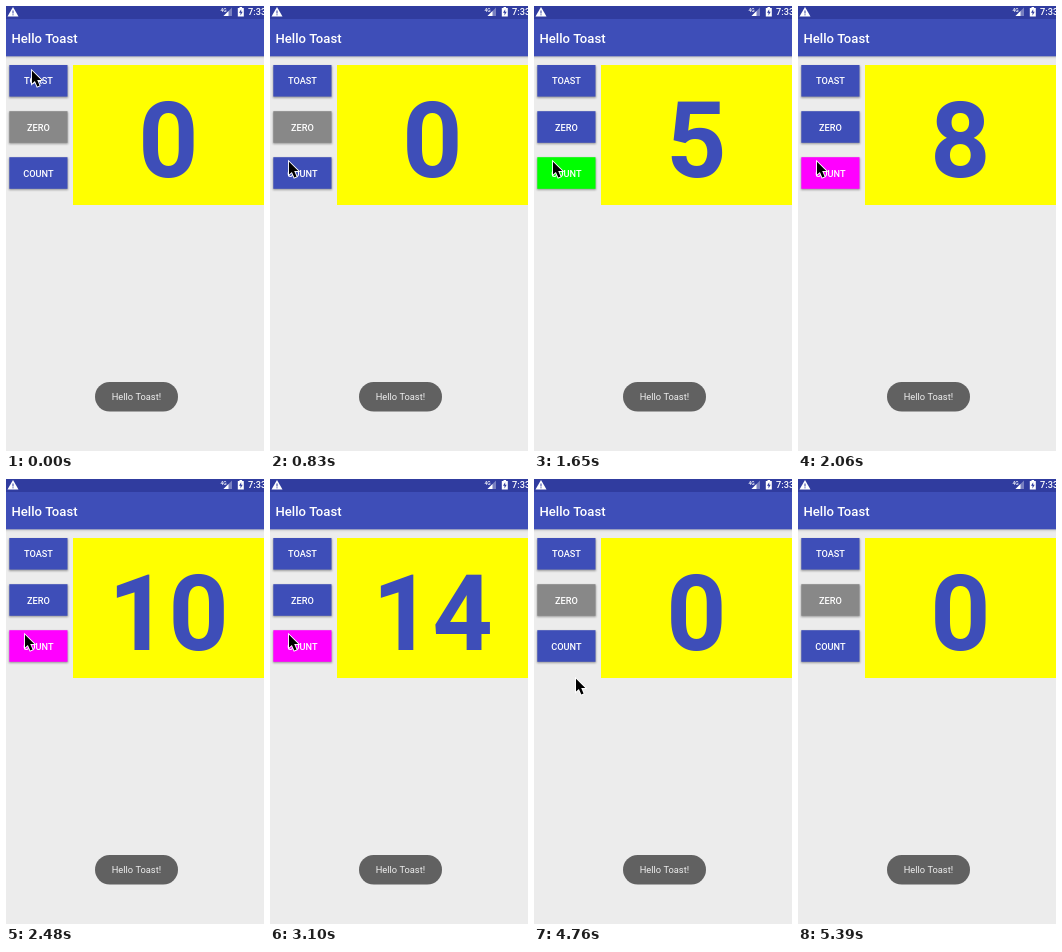
Recreate the animation shown at these times as an HTML page with a canvas. Size 258 px wide and 445 px high, loop 5.97 s.

```html
<!DOCTYPE html>
<html lang="en">
<head>
<meta charset="utf-8">
<title>Hello Toast</title>
<style>
html, body { margin: 0; width: 258px; height: 445px; overflow: hidden; background: #ececec; }
canvas { display: block; width: 258px; height: 445px; }
</style>
</head>
<body>
<canvas id="stage"></canvas>
<script>
const W = 258, H = 445, LOOP = 5970;
const BLUE = '#3e4eb8', GRAY = '#888', PINK = '#ff00ff', GREEN = '#00ff00';
const canvas = document.getElementById('stage');
const ratio = window.devicePixelRatio || 1;
canvas.width = W * ratio;
canvas.height = H * ratio;
const ctx = canvas.getContext('2d');
ctx.scale(ratio, ratio);

// Pointer samples: time, x, y
const pointer = [
  [0, 25, 63], [210, 14, 120], [410, 14, 124], [620, 16, 148],
  [830, 18, 154], [3310, 19, 106], [3520, 20, 103], [3720, 21, 115],
  [4760, 41, 198], [4970, 125, 401], [5180, 196, 435], [5390, -50, -50]
];
// Counter samples: time, value
const counter = [
  [0, 0], [1030, 1], [1240, 2], [1450, 3], [1650, 5], [1860, 6], [2060, 8],
  [2270, 9], [2480, 10], [2690, 11], [2890, 13], [3100, 14], [3930, 0]
];

const at = (steps, t) => steps.filter(s => s[0] <= t).pop();

function rect(x, y, w, h, color) {
  ctx.fillStyle = color;
  ctx.fillRect(x, y, w, h);
}

function shape(points, color) {
  ctx.beginPath();
  points.forEach(([x, y]) => ctx.lineTo(x, y));
  ctx.closePath();
  ctx.fillStyle = color;
  ctx.fill();
}

function text(str, x, y, size, weight, color = '#fff', align = 'center') {
  ctx.font = `${weight} ${size}px Roboto, sans-serif`;
  ctx.textAlign = align;
  ctx.fillStyle = color;
  ctx.fillText(str, x, y);
}

function raised(blur, draw) {
  ctx.save();
  ctx.shadowColor = 'rgba(0,0,0,.35)';
  ctx.shadowBlur = blur * ratio;
  ctx.shadowOffsetY = ratio;
  draw();
  ctx.restore();
}

function button(label, y, color) {
  raised(2, () => rect(3.3, y, 58.2, 31.6, color));
  text(label, 32.4, y + 19.3, 9.2, 500);
}

function statusBar() {
  rect(0, 0, W, 13, '#303c9f');
  shape([[7, 1], [12.5, 10.5], [1.5, 10.5]], '#fff');
  rect(6.5, 4.5, 1, 3, '#303c9f');
  rect(6.5, 8.3, 1, 1, '#303c9f');
  text('4G', 214.5, 5.5, 5, 500, '#fff', 'left');
  shape([[226, 1.5], [226, 10], [217.5, 10]], 'rgba(255,255,255,.35)');
  shape([[222.5, 5], [222.5, 10], [217.5, 10]], '#fff');
  rect(233.5, 1, 2.6, 1.5, '#fff');
  rect(231.8, 2, 6, 8.5, '#fff');
  shape([[235.2, 3.2], [233, 6.8], [234.5, 6.8], [234.5, 9.4], [236.7, 5.8], [235.2, 5.8]], '#303c9f');
  text('7:33', 242, 9.4, 9.2, 500, '#fff', 'left');
}

function arrow(x, y) {
  ctx.save();
  ctx.translate(x, y);
  ctx.lineJoin = 'miter';
  ctx.beginPath();
  [[1, 1.8], [1, 14.6], [3.9, 11.9], [6.3, 17.6], [8.6, 16.6], [6.2, 11.1], [10.3, 11]]
    .forEach(([px, py]) => ctx.lineTo(px, py));
  ctx.closePath();
  ctx.strokeStyle = '#fff';
  ctx.lineWidth = 1.8;
  ctx.stroke();
  ctx.fillStyle = '#000';
  ctx.fill();
  ctx.restore();
}

function draw(t) {
  const count = at(counter, t)[1];
  const [, px, py] = at(pointer, t);
  const countColor = count === 0 ? BLUE : count % 2 ? GREEN : PINK;

  rect(0, 0, W, H, '#ececec');
  raised(3, () => rect(-5, 13, W + 10, 37.3, BLUE));
  statusBar();
  text('Hello Toast', 5.5, 37, 13.1, 500, '#fff', 'left');

  button('TOAST', 59, BLUE);
  button('ZERO', 105.2, count ? BLUE : GRAY);
  button('COUNT', 151.2, countColor);

  rect(67, 59, 191, 140, '#ffff00');
  text(count, 162.4, 170.5, 105, 700, BLUE);

  ctx.beginPath();
  ctx.roundRect(89, 376, 83, 29.5, 14.7);
  ctx.fillStyle = '#616161';
  ctx.fill();
  text('Hello Toast!', 130.4, 394.2, 9.3, 400, '#f0f0f0');

  arrow(px, py);
}

function tick() {
  draw(performance.now() % LOOP);
  requestAnimationFrame(tick);
}
tick();
</script>
</body>
</html>
```
